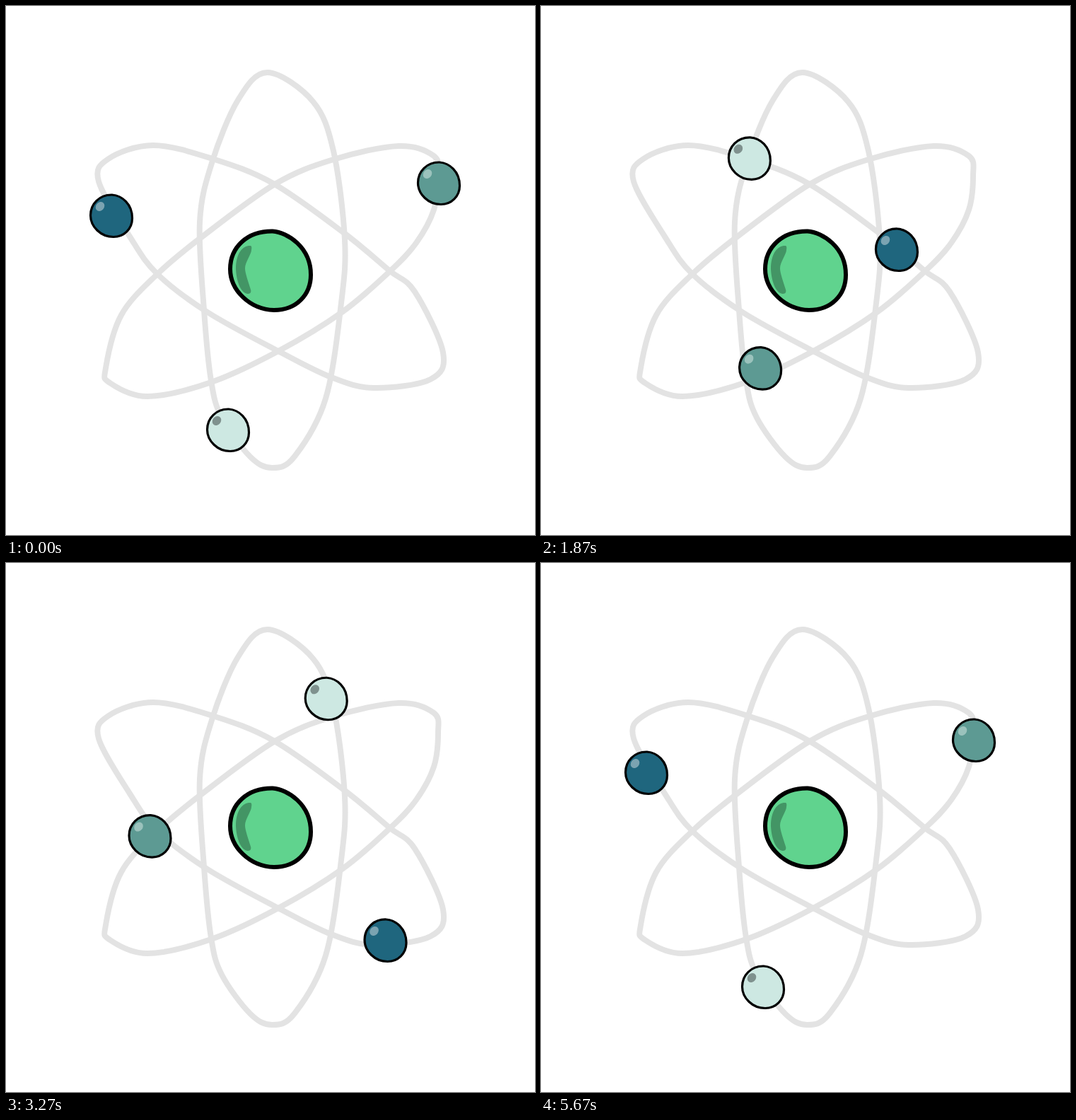
Write an HTML page that moves like this. It is 748 px wide and 748 px high and loops after 5740 ms.

```html
<!DOCTYPE html>
<html lang="en">
<head>
<meta charset="utf-8">
<title>Atom</title>
<style>
  html, body { margin: 0; width: 100%; height: 100%; overflow: hidden; background: #fff; }
  svg { display: block; width: 100%; height: 100%; }
</style>
</head>
<body>
<svg viewBox="0 0 748 748">
  <g id="orbits" fill="none" stroke="#e3e3e3" stroke-width="8"></g>
  <g id="nucleus">
    <path fill="#60d38e" stroke="#000" stroke-width="6" stroke-linejoin="round"
      d="M377 318.500C398 320 431 341 431 380C431 409 410 430 379 430C345 429 317 402 317 372C317 341 341 318 377 318.500Z"/>
    <path fill="#439565"
      d="M346 339C336 338 325 348 325 372C326 393 334 407 342 407C346 407 347 404 346 401C342 388 338 377 338 371C338 362 347 351 347 345Q348 340 346 339Z"/>
  </g>
  <g id="electrons"></g>
</svg>
<script>
const LOOP = 5740, STEP = 200 / 3, LAST = 85, PERIOD = LAST * STEP;
const byId = id => document.getElementById(id);
const electrons = [];

function add(parent, tag, attrs) {
  const node = document.createElementNS('http://www.w3.org/2000/svg', tag);
  for (const name in attrs) node.setAttribute(name, attrs[name]);
  return parent.appendChild(node);
}

// Closed smooth curve through the given points.
function addOrbit(points) {
  const n = points.length, at = i => points[(i + n) % n];
  const handle = (i, side) => [0, 1].map(a => at(i)[a] + side * (at(i + 1)[a] - at(i - 1)[a]) / 6);
  const curves = points.map((_, i) => 'C' + [handle(i, 1), handle(i + 1, -1), at(i + 1)].join(' '));
  add(byId('orbits'), 'path', { d: 'M' + points[0] + curves.join('') + 'Z' });
}

// One point per entry of keyTimes.
function addElectron(fill, shine, points) {
  const node = add(byId('electrons'), 'g', {});
  add(node, 'path', {
    d: 'M1-30C15-29 29.500-17 29.500 3C29.500 18 18 29.500 3 29.500C-15 29.500-29.500 15-29.500-1C-29.500-17-17-30.500 1-30Z',
    fill, stroke: '#000', 'stroke-width': 3.2
  });
  add(node, 'ellipse', { rx: 5.8, ry: 7, fill: shine, transform: 'translate(-16 -13.500) rotate(40)' });
  electrons.push({ node, points });
}

addOrbit([[370,94],[328,133],[291,222],[274,305],[280,430],[290,530],[305,582],[345,637],
  [376,653],[408,637],[452,555],[474,420],[479,330],[463,205],[434,135]]);
addOrbit([[208,197],[145,216],[131,248],[175,326],[214,379],[285,433],[385,488],[460,525],
  [520,540],[600,528],[618,490],[578,404],[542,374],[478,321],[378,251],[292,216]]);
addOrbit([[555,198],[605,212],[611,240],[605,288],[580,335],[543,375],[475,433],[385,488],
  [290,532],[200,552],[147,533],[141,512],[163,437],[214,379],[275,328],[380,252],[463,217]]);

const keyTimes = [0, 300, 600, 1000, 1400, 1800, 2400, 2700, 3000, 3270, 3600, 4070, 4480, 4870, 5150, 5400];

addElectron('#1f667e', '#7ba3b1', [[149,297],[142,236],[187,208],[285,215],[381,266],[488,334],
  [591,433],[611,495],[583,527],[536,534],[492,527],[404,491],[325,447],[250,404],[214,372],[185,340]]);
addElectron('#5d9a93', '#9bc2bc', [[612,251],[602,297],[567,346],[490,412],[405,470],[325,507],
  [186,541],[148,505],[169,435],[204,386],[260,340],[347,275],[426,234],[506,208],[566,202],[602,219]]);
addElectron('#cde8e2', '#7f918e', [[314,600],[292,540],[283,477],[276,400],[275,315],[291,229],
  [338,126],[372,101],[420,130],[453,193],[467,260],[473,355],[468,450],[450,548],[404,634],[345,637]]);

// Cubic interpolation over unevenly spaced, repeating keys.
function position(points, time) {
  const n = points.length, t = time % PERIOD;
  const at = i => {
    const k = (i + n) % n;
    return [keyTimes[k] + Math.floor(i / n) * PERIOD, ...points[k]];
  };
  let i = n - 1;
  while (keyTimes[i] > t) i--;
  const [p, a, b, q] = [at(i - 1), at(i), at(i + 1), at(i + 2)];
  const span = b[0] - a[0], u = (t - a[0]) / span;
  const slope = (k0, k1, k2, axis) => {
    const before = k1[0] - k0[0], after = k2[0] - k1[0];
    const v0 = (k1[axis] - k0[axis]) / before, v1 = (k2[axis] - k1[axis]) / after;
    return (v0 * after + v1 * before) / (before + after);
  };
  return [1, 2].map(axis => {
    const m0 = slope(p, a, b, axis) * span, m1 = slope(a, b, q, axis) * span;
    const d = b[axis] - a[axis];
    return a[axis] + u * (m0 + u * (3 * d - 2 * m0 - m1 + u * (m0 + m1 - 2 * d)));
  });
}

function draw(now) {
  const clock = Math.floor(now % LOOP / 10) * 10;
  const time = Math.min(LAST, Math.floor((clock + 5) / STEP)) * STEP;
  for (const { node, points } of electrons) {
    node.setAttribute('transform', `translate(${position(points, time).join(' ')})`);
  }
}

const start = performance.now();
function tick() {
  draw(performance.now() - start);
  requestAnimationFrame(tick);
}
tick();
</script>
</body>
</html>
```
